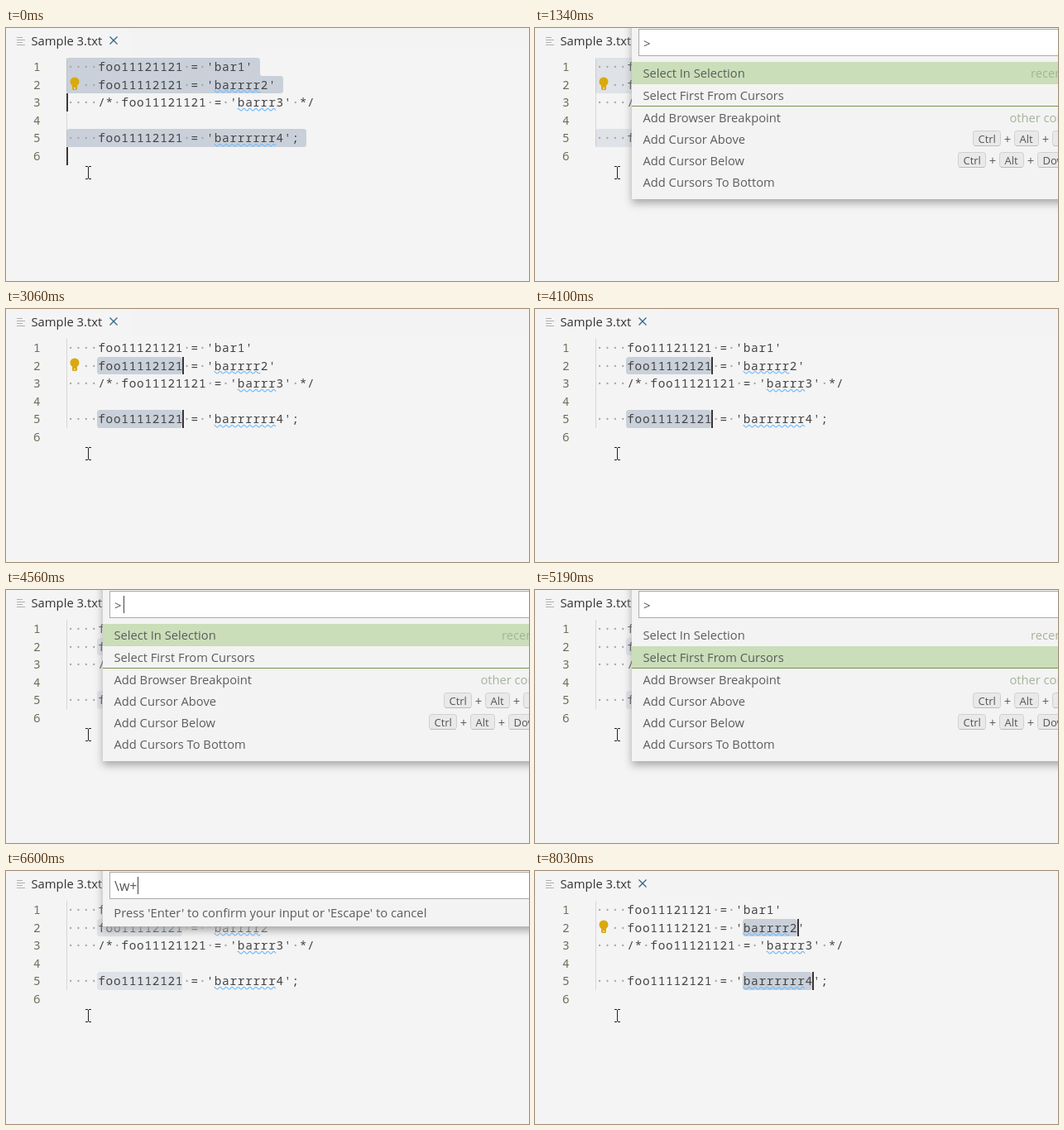
Recreate the animation shown at these times as an HTML page with a canvas. Size 632x306 px, loop 8430 ms.

```html
<!DOCTYPE html>
<html lang="en">
<head>
<meta charset="utf-8">
<title>Select in selection</title>
<style>
  html, body { margin: 0; width: 100%; height: 100%; overflow: hidden; background: #f4f4f4; }
  canvas { display: block; }
</style>
</head>
<body>
<canvas id="stage" width="632" height="306"></canvas>
<script>
const ctx = document.getElementById('stage').getContext('2d');
const LOOP = 8430, W = 632, H = 306;
const LEFT = 73.4, TOP = 36.5, LINE = 21.6, CHAR = 9.37;
const UI = '"Open Sans", "Noto Sans", sans-serif';
const MONO = '14.4px "Noto Sans Mono", monospace';

const lines = [
  "    foo11121121 = 'bar1'",
  "    foo11112121 = 'barrrr2'",
  "    /* foo11121121 = 'barrr3' */",
  "",
  "    foo11112121 = 'barrrrrr4';",
  ""
];
const commands = ['Select In Selection', 'Select First From Cursors', 'Add Browser Breakpoint',
  'Add Cursor Above', 'Add Cursor Below', 'Add Cursors To Bottom'];
const commandBaselines = [60, 87, 114, 140, 166, 192];

const colX = col => LEFT + col * CHAR;
const snapX = col => Math.floor(colX(col));
const lineY = n => Math.floor(TOP + n * LINE);

function rect(x, y, w, h, color) {
  ctx.fillStyle = color;
  ctx.fillRect(x, y, w, h);
}

function text(str, x, y, size, color) {
  ctx.font = size + 'px ' + UI;
  ctx.fillStyle = color;
  ctx.fillText(str, x, y);
}

function polyline(points, color, width) {
  ctx.beginPath();
  for (const [x, y] of points) ctx.lineTo(x, y);
  ctx.strokeStyle = color;
  ctx.lineWidth = width;
  ctx.stroke();
}

function roundedPolygon(points, radius, color) {
  const last = points[points.length - 1];
  ctx.beginPath();
  ctx.moveTo((last[0] + points[0][0]) / 2, (last[1] + points[0][1]) / 2);
  points.forEach((p, i) => ctx.arcTo(...p, ...points[(i + 1) % points.length], radius));
  ctx.closePath();
  ctx.fillStyle = color;
  ctx.fill();
}

function select(line, from, to, color) {
  const a = snapX(from), b = snapX(to), y = lineY(line), end = lineY(line + 1);
  roundedPolygon([[a, y], [b, y], [b, end], [a, end]], 3.6, color);
}

function selectWholeLines(color) {
  const a = snapX(0), b = snapX(25), c = snapX(28), y = [0, 1, 2].map(lineY);
  roundedPolygon([[a, y[0]], [b, y[0]], [b, y[1]], [c, y[1]], [c, y[2]], [a, y[2]]], 3.6, color);
  select(4, 0, 31, color);
}

function squiggle(line, from, to) {
  const points = [], y = lineY(line + 1) - 2.3;
  for (let x = colX(from); x <= colX(to); x += 0.6)
    points.push([x, y + 1.3 * Math.sin((x - LEFT) * 2 * Math.PI / 7.2)]);
  polyline(points, '#75beff', 1.2);
}

function drawTab() {
  rect(150, 0, W, 33, '#f3f3f3');
  [7, 10, 7, 10].forEach((w, i) => rect(13, 11 + i * 3, w, 1, '#b0b0b0'));
  text('Sample 3.txt', 30.5, 21, 14.8, '#333');
  polyline([[125.5, 10.5], [134.5, 19.5]], '#2f6687', 1.2);
  polyline([[134.5, 10.5], [125.5, 19.5]], '#2f6687', 1.2);
}

function drawCode(bulb) {
  rect(73, lineY(0), 1, lineY(5) - lineY(0), 'rgba(170,170,170,.4)');
  ctx.letterSpacing = '0.73px';
  lines.forEach((line, n) => {
    const base = lineY(n) + 16;
    ctx.font = MONO;
    ctx.fillStyle = '#6d705b';
    ctx.fillText(n + 1, 33, base);
    ctx.fillStyle = '#444';
    ctx.fillText(line, LEFT + 0.36, base);
    ctx.fillStyle = '#a6a6a6';
    [...line].forEach((ch, col) => {
      if (ch !== ' ' || (bulb && n === 1 && col < 2)) return;
      ctx.beginPath();
      ctx.arc(colX(col + 0.5), base - 5, 1.15, 0, 7);
      ctx.fill();
    });
  });
  ctx.letterSpacing = '0px';
  squiggle(1, 19, 25);
  squiggle(2, 22, 27);
  squiggle(4, 19, 27);
  if (bulb) drawBulb();
}

function drawBulb() {
  ctx.fillStyle = '#d9a90f';
  ctx.beginPath();
  ctx.arc(83, 65, 5.5, 0, 7);
  ctx.roundRect(80, 69, 6, 6, 1.5);
  ctx.fill();
  rect(82, 72, 2, 1.5, '#ece3c4');
}

function drawPointer() {
  rect(99, 168, 1, 14, '#222');
  for (const y of [167, 182]) {
    rect(96, y, 3, 1, '#222');
    rect(100, y, 3, 1, '#222');
  }
}

function drawCarets(list) {
  for (const [line, col] of list)
    rect(snapX(col), lineY(line), 2, lineY(line + 1) - lineY(line), '#3f3638');
}

function drawWidget(height) {
  const far = 2000;
  ctx.save();
  ctx.shadowColor = '#a8a8a8';
  ctx.shadowBlur = 9.6;
  ctx.shadowOffsetX = far;
  ctx.shadowOffsetY = 5;
  rect(117 - far, -20, W, height + 20, '#000');
  ctx.restore();
  rect(117, 0, W, height, '#f3f3f3');
  rect(125, 1, W, 33, '#a9abab');
  rect(126, 2, W, 31, '#fff');
}

function inputCaret(x) {
  rect(Math.round(x), 7, 1, 21, '#444');
}

function drawKeys(x, top, lastKey) {
  for (const [label, width] of [['Ctrl', 34], ['Alt', 30], [lastKey, 80]]) {
    ctx.beginPath();
    ctx.roundRect(x + 0.5, top + 0.5, width - 1, 18, 3);
    ctx.fillStyle = '#e9e9e9';
    ctx.fill();
    ctx.strokeStyle = '#d0d0d0';
    ctx.lineWidth = 1;
    ctx.stroke();
    rect(x + 2, top + 18, width - 4, 1, '#bdbdbd');
    text(label, x + 6.5, top + 14.5, 13, '#555');
    x += width;
    text('+', x + 3.8, top + 15.5, 14.7, '#5c5c5c');
    x += 16;
  }
}

function drawPalette(focused, caret) {
  drawWidget(207);
  text('>', 131, 24, 15, '#555');
  if (caret) inputCaret(142);
  rect(117, focused ? 68 : 41, W, focused ? 26 : 27, '#cadeb9');
  rect(117, 94, W, 1, '#749351');
  commands.forEach((name, i) => text(name, 130.5, commandBaselines[i], 14.7, '#5c5c5c'));
  text('recently used', 599, 60, 14.7, '#a6b39b');
  text('other commands', 573.5, 114, 14.7, '#a6b39b');
  drawKeys(529, 124, 'UpArrow');
  drawKeys(511, 150, 'DownArrow');
}

function drawPrompt(value, caret) {
  drawWidget(67);
  text("Press 'Enter' to confirm your input or 'Escape' to cancel", 130.3, 56, 14.8, '#5c5c5c');
  if (value) text(value, 131, 24, 16, '#555');
  else text('Enter regexp', 131, 24, 14.7, '#a8a8a8');
  ctx.font = '16px ' + UI;
  if (caret) inputCaret(131.5 + ctx.measureText(value).width);
}

function draw(t) {
  const during = (from, to) => t >= from && t < to;
  const palette = during(790, 1800) || during(4560, 5570);
  const prompt = during(1800, 3000) || during(5570, 7000);
  const selection = palette || prompt ? '#dfe2e7' : '#c9d0d9';

  rect(0, 0, W, H, '#f4f4f4');
  drawTab();

  let carets;
  if (t < 3000) {
    selectWholeLines(selection);
    carets = [[2, 0], [5, 0]];
  } else if (t < 7000) {
    for (const line of [1, 4]) select(line, 4, 15, selection);
    carets = [[1, 15], [4, 15]];
  } else {
    select(1, 19, 26, selection);
    select(4, 19, 28, selection);
    carets = [[1, 26], [4, 28]];
  }
  drawCode(!during(3310, 7250));
  drawPointer();

  const blinkedOff = during(160, 620) || during(3540, 4100) || during(7480, 8030);
  if (!palette && !prompt && !blinkedOff) drawCarets(carets);

  if (palette) drawPalette(t >= 5190, !during(1340, 1800) && !during(5020, 5570));
  if (prompt) {
    const value = t < 3000
      ? (t < 2430 ? '' : "foo\\d+(?=\\s=\\s'barrr)")
      : '\\w+'.slice(0, (t >= 6120) + (t >= 6200) + (t >= 6600));
    drawPrompt(value, !during(2280, 2430));
  }
}

function frame() {
  draw(performance.now() % LOOP);
  requestAnimationFrame(frame);
}
frame();
</script>
</body>
</html>
```
